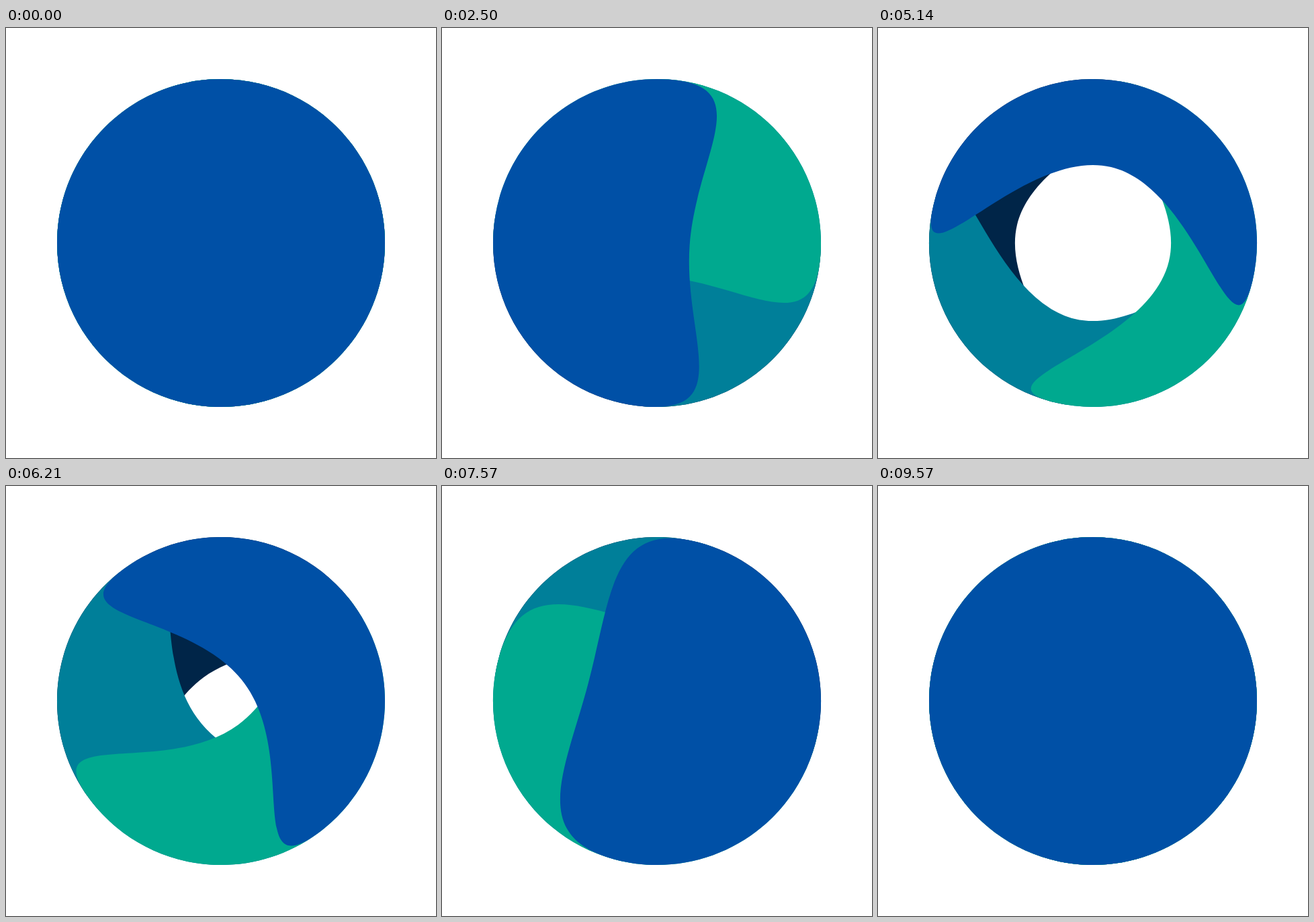
An HTML page that plays this animation: 640x640 px, repeating every 9640 ms.

```html
<!DOCTYPE html>
<html lang="en">
<head>
<meta charset="utf-8">
<title>Turning ring</title>
<style>
  html, body { margin: 0; height: 100%; overflow: hidden; background: #fff; }
  svg { display: block; width: 100%; height: 100%; }
</style>
</head>
<body>
<svg viewBox="-320 -320 640 640">
  <defs><path id="blade"/></defs>
  <g id="ring">
    <use href="#blade" fill="#002548" transform="rotate(270)"/>
    <use href="#blade" fill="#007f99" transform="rotate(180)"/>
    <use href="#blade" fill="#00a98f" transform="rotate(90)"/>
    <use href="#blade" fill="#0050a6"/>
  </g>
</svg>
<script>
const LOOP = 9640, FPS = 14, LAST_STEP = 134;
const R = 244, H = R * 0.5523;
const blade = document.getElementById('blade');
const ring = document.getElementById('ring');

const smooth = u => u * u * (3 - 2 * u);

// A circle whose lower vertex sits at height y; y = R is the full disc.
const bladePath = y =>
  `M${-R} 0C${-R} ${-H} ${-H} ${-R} 0 ${-R}S${R} ${-H} ${R} 0` +
  `C${R} ${H} ${H} ${y} 0 ${y}S${-R} ${H} ${-R} 0Z`;

function draw(ms) {
  // Steps run at 14 per second, aligned to hundredths of a second.
  const step = Math.floor((Math.floor(ms / 10) + 0.5) * FPS / 100);
  const p = Math.min(step / LAST_STEP, 1);
  const open = smooth(1 - Math.abs(2 * p - 1));
  blade.setAttribute('d', bladePath(R - 1.5 * R * open));
  ring.setAttribute('transform', `rotate(${360 * p - 180})`);
}

function tick() {
  draw(performance.now() % LOOP);
  requestAnimationFrame(tick);
}
tick();
</script>
</body>
</html>
```
